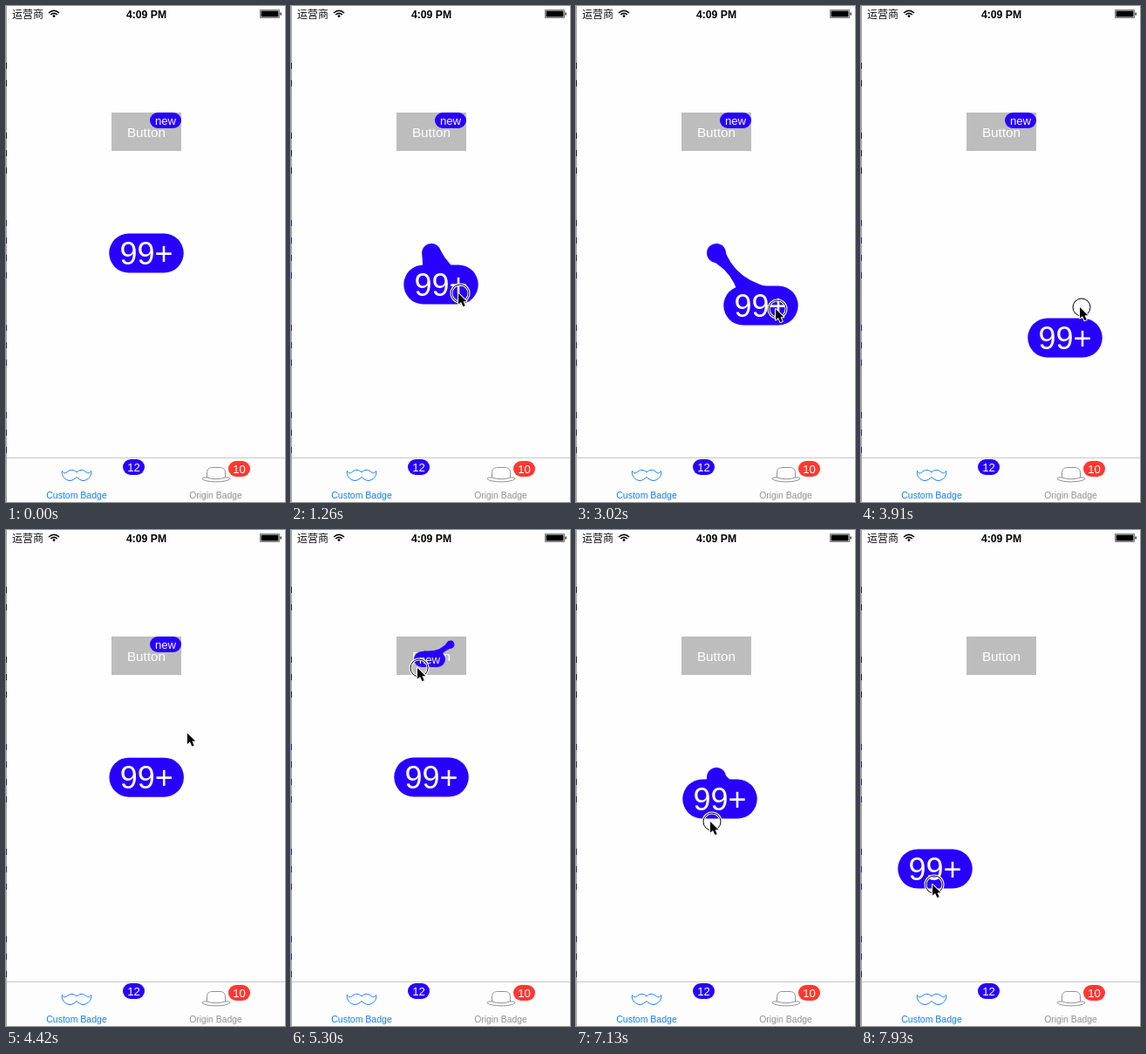
These frames come from a looping animation (320 px wide and 568 px high, 8000 ms). An HTML page with a canvas:

```html
<!DOCTYPE html>
<html>
<head>
<meta charset="utf-8">
<style>
html, body { margin: 0; height: 100%; overflow: hidden; background: #fefefe; }
canvas { display: block; }
</style>
</head>
<body>
<canvas id="stage" width="320" height="568"></canvas>
<script>
const g = document.getElementById('stage').getContext('2d');
const SANS = '"Liberation Sans", Arial, sans-serif';
const BLUE = '#2800ff', TINT = '#157efb', GRAY = '#929292';
const LOOP = 8000, STEP = 87.7, ORIGIN = 1260;
const BIG = [161, 283], SMALL = [183, 131];
const PRESS = -7, RELEASE = 31, PRESS_SMALL = 41, POP = 52, PRESS_AGAIN = 60;

// Turning points of the pointer: step, x, y
const path = [
  [-12, 318, 340], [PRESS, 182, 292], [-1, 193, 328], [0, 194, 329], [13, 239, 407],
  [19, 233, 352], [20, 231, 347], [27, 253, 426], [29, 255, 389], [30, 253, 345],
  [PRESS_SMALL, 174, 139], [45, 150, 156], [46, 147, 158], [51, 124, 178], [56, 119, 220],
  [PRESS_AGAIN, 160, 301], [65, 164, 326], [75, 84, 406]
];

function hand(n) {
  const i = path.findIndex(k => k[0] > n);
  if (i < 0) return path.at(-1).slice(1);
  const [t0, x0, y0] = path[Math.max(i - 1, 0)], [t1, x1, y1] = path[i];
  const u = Math.max(0, (n - t0) / (t1 - t0 || 1));
  return [x0 + (x1 - x0) * u, y0 + (y1 - y0) * u];
}

// A dragged badge trails the pointer by one step
function dragged(rest, press, n) {
  const [x0, y0] = hand(press), [x, y] = hand(Math.max(press, n - 1));
  return [rest[0] + x - x0, rest[1] + y - y0];
}

function bigPlace(n) {
  if (n >= PRESS_AGAIN) return dragged(BIG, PRESS_AGAIN, n);
  const [x, y] = dragged(BIG, PRESS, Math.min(n, RELEASE));
  const k = Math.max(0, n - RELEASE);
  const spring = Math.exp(-1.2 * k) * Math.cos(1.3 * k);
  return [BIG[0] + (x - BIG[0]) * spring, BIG[1] + (y - BIG[1]) * spring];
}

function rect(x, y, w, h, color) {
  g.fillStyle = color;
  g.fillRect(x, y, w, h);
}

function text(s, x, y, size, color, weight = '', family = SANS) {
  g.font = `${weight} ${size}px ${family}`;
  g.textAlign = 'center';
  g.fillStyle = color;
  g.fillText(s, x, y);
}

function outline(d, color, width = 1) {
  g.lineJoin = 'round';
  g.strokeStyle = color;
  g.lineWidth = width;
  g.stroke(new Path2D(d));
}

function disc(x, y, r) {
  g.beginPath();
  g.arc(x, y, r, 0, 7);
  g.fill();
}

function badge(s, x, y, w, h, size, color = BLUE) {
  g.fillStyle = color;
  g.beginPath();
  g.roundRect(x - w / 2, y - h / 2, w, h, h / 2);
  g.fill();
  text(s, x, y + size * 0.37, size, '#fff');
}

// Sticky drop from the rest point to the dragged badge
function drop([x0, y0], [x, y], scale) {
  const d = Math.hypot(x - x0, y - y0);
  if (d < 1 || d > 82 * scale) return;
  const r = 11 * scale, end = 29 * scale, mid = 33 * scale - d / 2;
  g.save();
  g.translate(x0, y0);
  g.rotate(Math.atan2(y - y0, x - x0));
  g.fillStyle = BLUE;
  disc(0, 0, r);
  g.beginPath();
  g.moveTo(0, -r);
  g.quadraticCurveTo(d / 2, -mid, d, -end);
  g.lineTo(d, end);
  g.quadraticCurveTo(d / 2, mid, 0, r);
  g.fill();
  g.restore();
}

// Sliver of a text window along the left side
function edge() {
  rect(0, 0, 1, 568, '#a5a5a8');
  for (let y = 65; y < 550; y += 20)
    if (Math.sin(y) > -0.3)
      rect(0, y, 1, 7, y > 200 ? '#2424b8' : y > 110 && y < 140 ? '#d01818' : '#222');
}

function statusBar() {
  text('运营商', 25, 13.5, 12, '#111', '', '"Noto Sans CJK SC", "Noto Sans CJK", sans-serif');
  text('4:09 PM', 161, 13.5, 12.2, '#000', 'bold');
  outline('M49 8 Q55 2.5 61 8 M51.2 10 Q55 6.6 58.8 10', '#000', 1.6);
  g.fillStyle = '#000';
  disc(55, 11.6, 1.4);
  outline('M291.5 4.5 H313.5 V13.5 H291.5 Z', '#000', 0.5);
  rect(292.5, 5.5, 20, 7, '#000');
  rect(314.5, 7.5, 1.2, 3, '#000');
}

function tabBar() {
  rect(1, 517, 319, 51, '#fdfdfd');
  rect(1, 517, 319, 1, '#c8c8c8');
  outline('M64.5 532.5 C66 536 69 535 71 533 C74 530.5 78 531 81 534 C84 531 88 530.5 91 533 C93 535 96 536 97.5 532.5 C99 538 94 543 89 543.5 C85 543.5 83 541 81 539.5 C79 541 77 543.5 73 543.5 C68 543 63 538 64.5 532.5 Z', TINT);
  outline('M230.5 540 V535 C230.5 530 233 528.5 237 528.5 H245 C249 528.5 251.5 530 251.5 535 V540 Q241 543.5 230.5 540 Q225 539.5 225 541.5 C229 546 253 546 257 541.5 Q257 539.5 251.5 540', GRAY);
  text('Custom Badge', 81, 563.5, 10.5, TINT);
  text('Origin Badge', 240.5, 563.5, 10.4, GRAY);
  badge('12', 146.5, 528, 25, 18, 13.2);
  badge('10', 267.5, 530, 25, 18, 13.2, '#ff3830');
}

function cursor(x, y, pressed) {
  if (pressed) {
    const ring = `M${x - 10} ${y} a10 10 0 1 0 20 0 a10 10 0 1 0 -20 0`;
    outline(ring, '#fff', 3);
    outline(ring, '#000');
  }
  g.save();
  g.translate(x - 2, y);
  g.scale(0.9, 0.9);
  const arrow = 'M0 0 V14 L3.4 11 L6 16.8 L8.6 15.7 L6.1 10.2 H10.3 Z';
  outline(arrow, '#fff', 2.2);
  g.fillStyle = '#000';
  g.fill(new Path2D(arrow));
  g.restore();
}

function draw(n) {
  rect(0, 0, 320, 568, '#fefefe');
  edge();
  statusBar();
  tabBar();
  rect(121, 122, 80, 44, '#bdbdbd');
  text('Button', 161, 149.5, 15.3, '#fff');

  const dragBig = n >= PRESS && n < RELEASE || n >= PRESS_AGAIN;
  const dragSmall = n >= PRESS_SMALL && n < POP;
  const big = bigPlace(n), small = dragged(SMALL, PRESS_SMALL, n);
  if (dragBig) drop(BIG, big, 1);
  badge('99+', ...big, 85.5, 45, 36);
  if (dragSmall) drop(SMALL, small, 0.41);
  if (n < POP) badge('new', ...small, 36, 18, 13.2);
  if (n >= path[0][0]) cursor(...hand(n), dragBig || dragSmall);
}

function tick() {
  draw(Math.floor((performance.now() % LOOP - ORIGIN) / STEP));
  requestAnimationFrame(tick);
}
tick();
</script>
</body>
</html>
```
